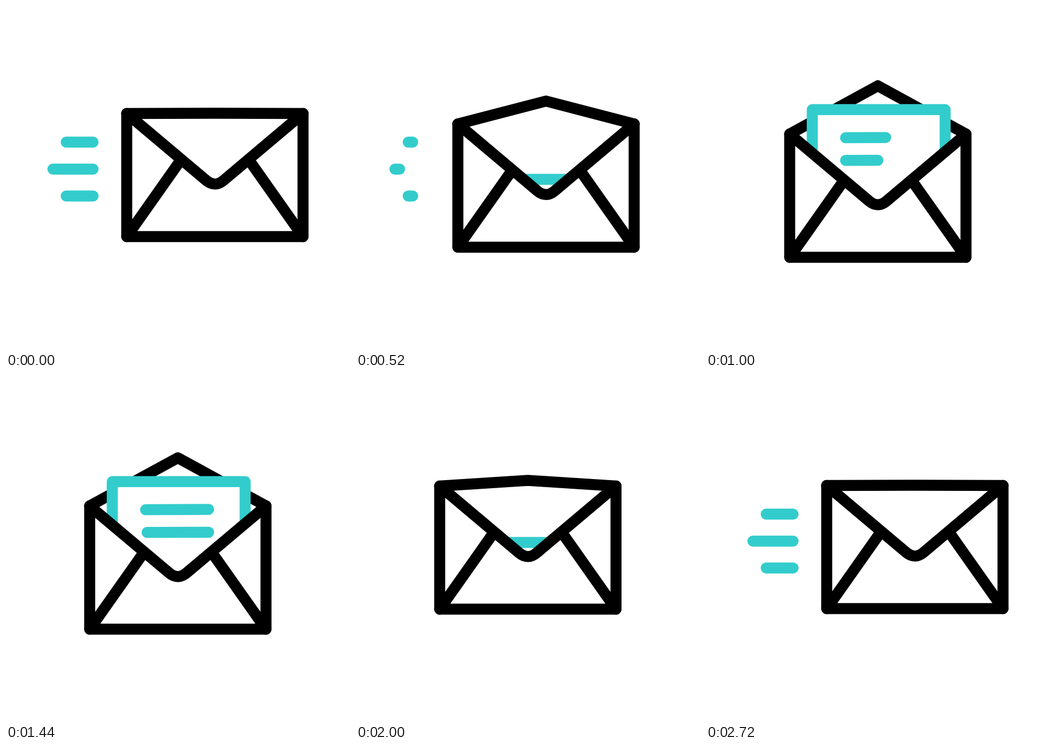
These frames come from a looping animation (640x640 px, 3 s). An HTML page with a canvas:

```html
<!DOCTYPE html>
<html>
<head>
<meta charset="utf-8">
<title>Letter</title>
<style>
  html, body { margin: 0; width: 100%; height: 100%; overflow: hidden; background: #fff; }
  canvas { display: block; width: 640px; height: 640px; }
</style>
</head>
<body>
<canvas width="640" height="640"></canvas>
<script>
const ctx = document.querySelector('canvas').getContext('2d');
const LOOP = 3000, STEP = 40;
const BLACK = '#000', TEAL = '#33cccc';

const progress = (t, start, length) => Math.min(1, Math.max(0, (t - start) / length));
const smooth = (t, start, length) => {
  const u = progress(t, start, length);
  return u * u * (3 - 2 * u);
};
const cubic = (t, start, length) => {
  const u = progress(t, start, length);
  return u < 0.5 ? 4 * u ** 3 : 1 - 4 * (1 - u) ** 3;
};

function stroke(color, path) {
  ctx.strokeStyle = color;
  ctx.stroke(new Path2D(path));
}

// A horizontal bar showing only the part between two fractions of its length
function bar(x1, y1, x2, y2, from, to) {
  if (to - from < 0.0005) return;
  const at = f => `${x1 + (x2 - x1) * f} ${y1 + (y2 - y1) * f}`;
  stroke(TEAL, `M${at(from)} L${at(to)}`);
}

function speedLines(t) {
  const leaving = t < 1400;
  const shift = leaving ? -34 * cubic(t, 70, 940) : 0;
  const side = leaving ? 1 - smooth(t, 130, 527) : smooth(t, 2080, 504);
  const middle = leaving ? 1 - smooth(t, 120, 508) : smooth(t, 2110, 503);
  bar(112 + shift, 253.3, 162 + shift, 253.3, 0, side);
  bar(87.3 + shift, 303.4, 162 + shift, 303.4, 0, middle);
  bar(112 + shift, 353.4, 162 + shift, 353.4, 0, side);
}

// Coordinates are relative to the middle of the envelope's closed top edge
const FLAP = 'L-16.5 124.3 C-5.5 133.7 5.5 133.7 16.5 124.3 L164 0';

function letter(t, top) {
  const sheet = `M-122 ${top + 320} V${top} H125.2 V${top + 320}`;
  ctx.fillStyle = '#fff';
  ctx.fill(new Path2D(sheet));
  stroke(TEAL, sheet);
  bar(-60, top + 52.4, 57.3, top + 51.7, smooth(t, 1440, 460), smooth(t, 710, 490));
  bar(-60, top + 94.5, 57.3, top + 94.2, smooth(t, 1398, 460), smooth(t, 752, 488));
}

function envelope(t) {
  const opening = cubic(t, 37, 960);
  const x = 388.6 - 68.9 * (opening - cubic(t, 1970, 780));
  const y = 199.9 + 38.4 * (opening - cubic(t, 1350, 800));
  const apex = -0.5 - 89.4 * (cubic(t, 20, 1020) - cubic(t, 1345, 940));
  const sheetTop = 452.3 - 259.6 * (cubic(t, 30, 980) - cubic(t, 1570, 900));

  ctx.save();
  ctx.translate(x, y);
  stroke(BLACK, `M-164 0 L0 ${apex} L164 0`);

  ctx.save();
  ctx.clip(new Path2D(`M-164 0 ${FLAP} V-300 H-164 Z`));
  letter(t, sheetTop - y);
  ctx.restore();

  stroke(BLACK, 'M-164 0 V229.2 H164 V0');
  stroke(BLACK, 'M-164 229.2 L-66.5 91 M164 229.2 L66.5 91');
  stroke(BLACK, `M-164 0 ${FLAP}`);
  ctx.restore();
}

function draw(now) {
  const t = Math.floor((now % LOOP) / STEP) * STEP;
  ctx.clearRect(0, 0, 640, 640);
  ctx.lineWidth = 20.5;
  ctx.lineCap = ctx.lineJoin = 'round';
  speedLines(t);
  envelope(t);
}

const begin = performance.now();
function tick() {
  draw(performance.now() - begin);
  requestAnimationFrame(tick);
}
tick();
</script>
</body>
</html>
```
